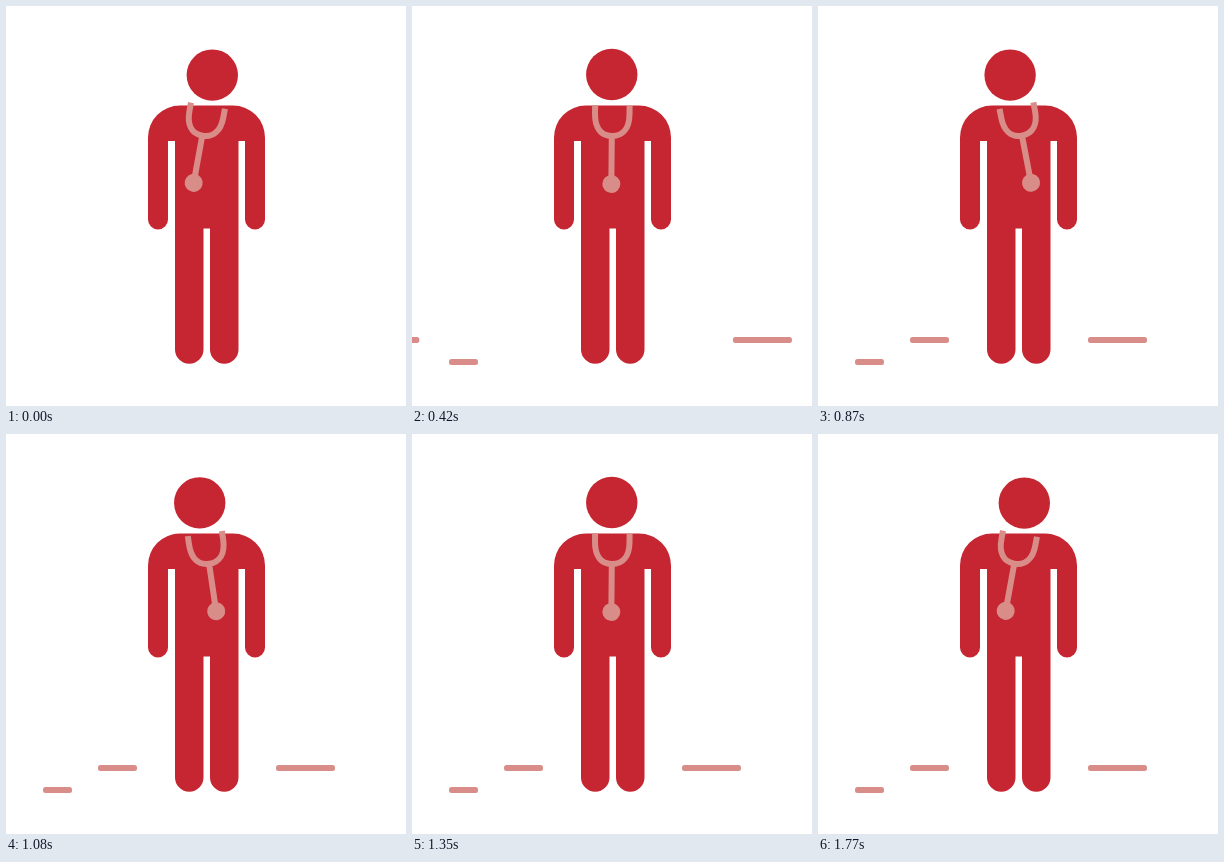
Animation of 400 by 400 pixels, one loop 1.8 s. Source, as an HTML page:

```html
<!DOCTYPE html>
<html>
<head>
<meta charset="utf-8">
<style>
  html, body { margin: 0; width: 100%; height: 100%; overflow: hidden; background: #fff; }
  svg { display: block; width: 100%; height: 100%; }
</style>
</head>
<body>
<svg viewBox="0 0 400 400">
  <g fill="#d98d89">
    <rect id="low" x="37" y="353" width="29" height="6" rx="2.5"/>
    <rect id="right" x="270" y="331" width="59" height="6" rx="2.5"/>
    <rect id="left" x="92" y="331" width="39" height="6" rx="2.5"/>
  </g>
  <g fill="#c62631">
    <path d="M174 99.500H227A32 32 0 0 1 259 131.500V213.500a10 10 0 0 1-20 0V135H232.500V343.500a14.250 14.250 0 0 1-28.500 0V222.500H197.500V343.500a14.250 14.250 0 0 1-28.500 0V135H162V213.500a10 10 0 0 1-20 0V131.500A32 32 0 0 1 174 99.500Z"/>
    <circle id="head" r="25.700"/>
  </g>
  <g id="scope" fill="none" stroke="#d98d89" stroke-width="6">
    <path d="M183 99.500V108C183 122 189 130 200 130S217.500 122 217.500 108V99.500M200 130V178"/>
    <circle cx="200" cy="178" r="9" fill="#d98d89" stroke="none"/>
  </g>
</svg>
<script>
const LOOP = 1800, STEP = 30, SWING = 1770, SLIDE = 210;
const byId = id => document.getElementById(id);
const ease = p => (1 - Math.cos(Math.PI * p)) / 2;
const clamp = p => Math.min(1, Math.max(0, p));

// Each dash slides in from outside the stage: id, start time, offset
const dashes = [['low', 210, -68], ['right', 300, 131], ['left', 386, -132]];

function draw(time) {
  const t = Math.floor(time % LOOP / STEP) * STEP;
  const sway = ease(2 * t / SWING);
  const lean = 2 * sway - 1;
  byId('head').setAttribute('cx', 206.3 - 14.2 * sway);
  byId('head').setAttribute('cy', 68.5 + 0.6 * lean * lean);
  byId('scope').setAttribute('transform', `rotate(${10.3 - 21.2 * sway} 200 109)`);
  for (const [id, start, offset] of dashes) {
    const shift = offset * (1 - ease(clamp((t - start) / SLIDE)));
    byId(id).setAttribute('transform', `translate(${shift} 0)`);
  }
}

const begin = performance.now();
function tick() {
  draw(performance.now() - begin);
  requestAnimationFrame(tick);
}
tick();
</script>
</body>
</html>
```
